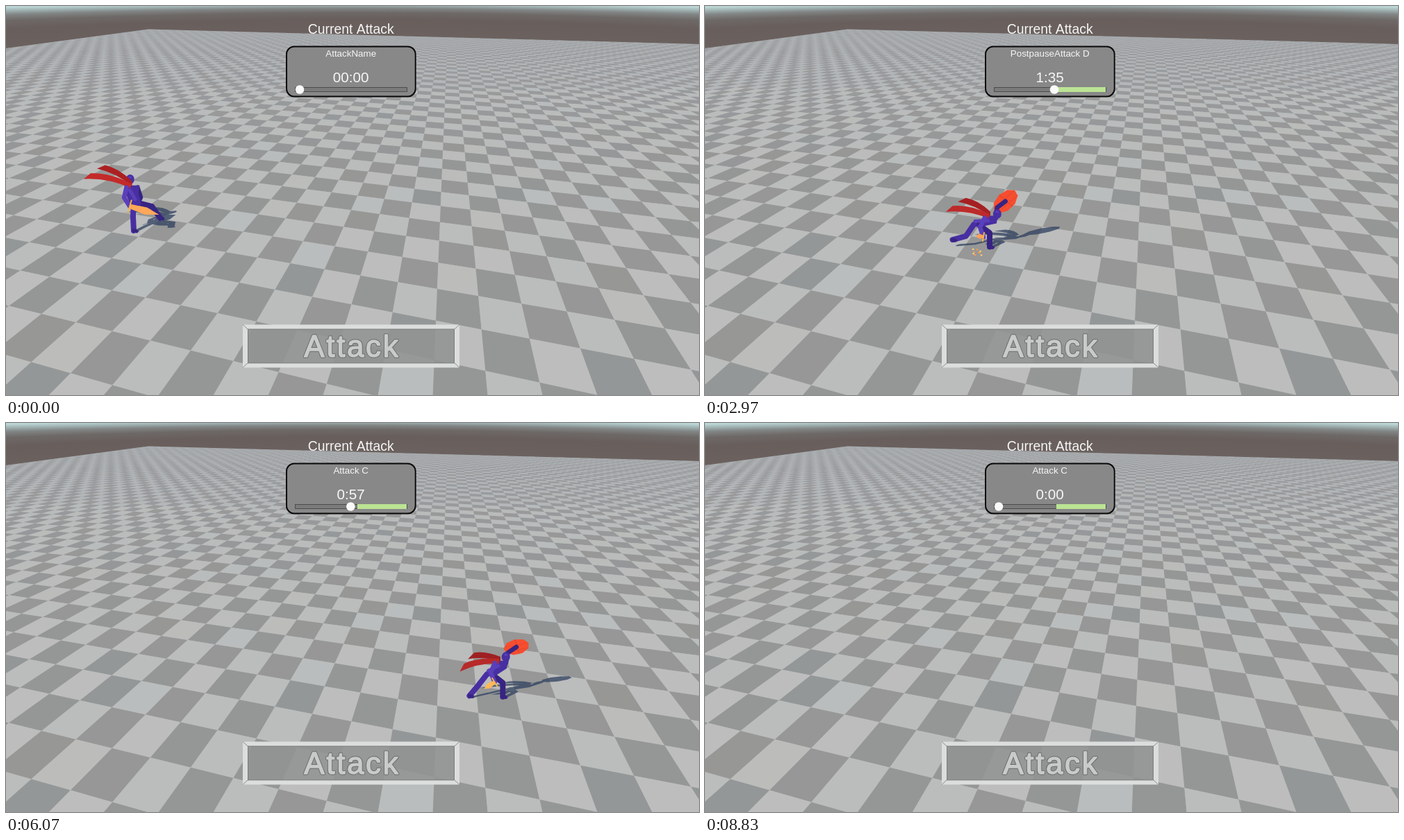
Write an HTML page with a canvas that moves like this. It is 998 px wide and 561 px high and loops after 9100 ms.

```html
<!DOCTYPE html>
<html lang="en">
<head>
<meta charset="utf-8">
<title>Current Attack</title>
<style>
html, body { margin: 0; width: 100%; height: 100%; overflow: hidden; background: #6a615f; }
canvas { display: block; }
</style>
</head>
<body>
<canvas id="stage" width="998" height="561"></canvas>
<script>
const W = 998, H = 561, LOOP = 9100;
const FONT = '"Liberation Sans", Arial, sans-serif';
const g = document.getElementById('stage').getContext('2d');

function layer() {
  const c = document.createElement('canvas');
  c.width = W; c.height = H;
  return c.getContext('2d');
}
const mix = (a, b, k) => a + (b - a) * k;
const clamp = v => Math.max(0, Math.min(1, v));
const smooth = k => k * k * (3 - 2 * k);
const rgb = (r, gr, b) => `rgb(${r | 0},${gr | 0},${b | 0})`;

// ---------- scene ----------
// Pinhole camera: focal length 486, pitched down so the horizon lies at y = -23.
const FOCAL = 486, HORIZON = -23;
const TILE = 0.1549, YAW = 13.7 * Math.PI / 180;
const stepX = TILE * Math.cos(YAW), stepZ = TILE * Math.sin(YAW);
const depth = (a, b) => 1.5685 - stepZ * a + stepX * b;
function project(a, b) {
  const y = 676 / depth(a, b);
  return [499 + 0.848 * (0.3338 + stepX * a + stepZ * b) * y, y + HORIZON];
}
function poly(c, pts) {
  c.beginPath();
  pts.forEach(p => c.lineTo(p[0], p[1]));
  c.closePath();
}
function drawSky(c) {
  const haze = [[0.028, '#bcd6d6'], [0.033, '#a3b6b6'], [0.04, '#828686'], [0.05, '#6d6866'], [0.065, '#685e5c'], [0.1, '#6b625f']];
  for (let x = 0; x < W; x += 4) {
    // the same angle below the horizon sits lower towards the sides
    const ray = Math.hypot(FOCAL, 270, x - 499) / 0.848;
    const sky = c.createLinearGradient(0, HORIZON, 0, HORIZON + 0.1 * ray);
    haze.forEach(h => sky.addColorStop(h[0] / 0.1, h[1]));
    c.fillStyle = sky;
    c.fillRect(x, 0, 4, 64);
  }
}
function makeScene() {
  const c = layer();
  drawSky(c);
  poly(c, [[205, 33.5], [998, 55], [998, 561], [0, 561], [0, 61]]);
  c.clip();
  const base = c.createLinearGradient(0, 30, 0, 330);
  base.addColorStop(0, '#a9adb0');
  base.addColorStop(0.2, '#b3b6b8');
  base.addColorStop(1, '#bcbdbc');
  c.fillStyle = base;
  c.fillRect(0, 0, W, H);
  for (let j = 57; j >= -9; j--) {
    for (let i = -59; i < 38; i++) {
      if (depth(i + 1, j) < 0.7) continue;
      const q = [project(i, j), project(i + 1, j), project(i + 1, j + 1), project(i, j + 1)];
      const y = q[0][1], far = clamp(1 - (y - 30) / 200);
      const n = Math.sin(i * 12.99 + j * 78.23) * 43758.5;
      const tint = (n - Math.floor(n) - 0.5) * 2.5;
      poly(c, q);
      if ((i + j) & 1) {
        const v = 150 + far * 6;
        c.globalAlpha = clamp(0.45 + (y - 30) / 70);
        c.fillStyle = rgb(v - tint, v + 1, v + 1 + tint + far * 3);
        c.fill();
      } else if (y > 120) {
        c.globalAlpha = 0.7;
        c.fillStyle = rgb(188 - tint, 190, 189 + tint);
        c.fill();
      }
    }
  }
  return c.canvas;
}
const scene = makeScene();

// ---------- fighter ----------
// Angles in degrees: 0 points down, 90 right. Legs: thigh, shin; near side first.
const run = { lean: -14, legs: [-3, 3, 75, 35], arms: [10, -5], blade: [74, 44], cape: [-108, 68], shield: [0, 0, 0] };
const cut = { lean: 12, legs: [-45, 18, 50, 0], arms: [5, 142], blade: [13, 30], cape: [-52, 52], shield: [15, 8, 40] };
const low = { lean: 65, legs: [-34, -75, 53, 0], arms: [-4, 150], blade: [-100, 11], cape: [-106, 62], shield: [21, 13, -43] };
const stand = { lean: 0, legs: [-40, -25, 56, 20], arms: [-22, 52], blade: [17, 38], cape: [-36, 44], shield: [11, 23, -11] };
const turn = { lean: 5, legs: [-35, -30, 50, 16], arms: [-100, -36], blade: [-113, 13], cape: [22, 46], shield: [16, 33, -9] };
const guard = { lean: 22, legs: [-63, -20, 80, 75], arms: [65, -138], blade: [197, 57], cape: [-95, 74], shield: [20, 9, 6] };

function blend(a, b, k) {
  if (typeof a === 'number') return mix(a, b, k);
  if (Array.isArray(a)) return a.map((v, i) => blend(v, b[i], k));
  const out = {};
  for (const name in a) out[name] = blend(a[name], b[name], k);
  return out;
}
function reach(p, deg, len) {
  const r = deg * Math.PI / 180;
  return [p[0] + Math.sin(r) * len, p[1] + Math.cos(r) * len];
}
const chain = (p, a, b, len) => {
  const mid = reach(p, a, len);
  return [p, mid, reach(mid, b, len)];
};

// ---------- attacks ----------
const moves = {
  A: { name: 'Attack A', time: 0.57, open: 518, close: 577, beats: [stand, guard, stand] },
  B: { name: 'Attack B', time: 0.6, open: 497, close: 554, beats: [stand, turn, cut, stand] },
  C: { name: 'Attack C', time: 1.15, open: 506, close: 577, beats: [stand, low, cut, stand] },
  D: { name: 'PostpauseAttack D', time: 2.5, open: 504, close: 577, beats: [stand, low, stand] }
};
const starts = [[540, 'A'], [988, 'B'], [1618, 'D'], [4480, 'A'], [5012, 'B'],
  [5500, 'C'], [6608, 'A'], [7060, 'B'], [7620, 'C']];
const path = [[0, 187], [560, 190], [1370, 277], [1620, 298], [2970, 390], [3830, 481],
  [4480, 484], [5270, 547], [6900, 850], [8300, 1180], [LOOP, 1400]];

function current(t) {
  const last = starts.filter(s => s[0] <= t).pop();
  if (!last) return null;
  const move = moves[last[1]], s = (t - last[0]) / 1000;
  return { move, s: s < move.time ? s : 0 };
}
function placeX(t) {
  const n = path.findIndex(k => k[0] > t), [a, b] = [path[n - 1], path[n]];
  return mix(a[1], b[1], (t - a[0]) / (b[0] - a[0]));
}
// each pose is held, then snaps to the next one
function poseOf(now, t) {
  if (!now) return blend(run, stand, smooth(clamp((t - 400) / 140)));
  const beats = now.move.beats, f = now.s / now.move.time * (beats.length - 1), n = Math.floor(f);
  return blend(beats[n], beats[n + 1], smooth(clamp((f - n - 0.3) / 0.45)));
}
function fighterAt(t, now) {
  const p = poseOf(now, t), x = placeX(t);
  const neck = reach([0, 0], 180 - p.lean, 23), [nx, ny] = neck;
  const [a, b] = p.arms, l = p.legs;
  const arms = [chain([nx - 8, ny + 1], a - 23, a + 23, 15), chain([nx + 8, ny + 1], b + 23, b - 23, 15)];
  const legs = [chain([-3, 1], l[0], l[1], 20), chain([4, 1], l[2], l[3], 20)];
  const tip = reach(arms[0][2], ...p.blade);
  return {
    x, y: 283 + 0.154 * (x - 187), neck, arms, legs, tip, cape: p.cape, shield: p.shield,
    head: reach(neck, 180 - p.lean, 11), ground: Math.max(legs[0][2][1], legs[1][2][1]) + 2
  };
}

function limb(c, pts, w, color) {
  c.strokeStyle = color;
  c.lineWidth = w;
  c.lineCap = c.lineJoin = 'round';
  c.beginPath();
  pts.forEach(p => c.lineTo(p[0], p[1]));
  c.stroke();
}
function ribbon(c, root, deg, len, color) {
  const end = reach(root, deg, len), bend = reach(reach(root, deg, len / 2), deg - 90, len * 0.12);
  const a = reach(end, deg + 90, 5), b = reach(reach(end, deg - 90, 5), deg, -8);
  const m = reach(bend, deg + 90, 4), n = reach(bend, deg - 90, 4);
  c.fillStyle = color;
  c.beginPath();
  c.moveTo(root[0], root[1] + 4);
  c.quadraticCurveTo(...m, ...a);
  c.lineTo(...b);
  c.quadraticCurveTo(...n, root[0], root[1] - 3);
  c.fill();
}
function drawShield(c, p, paint) {
  const [w, h, tilt] = p.shield, near = clamp((h - 23) / 10);
  if (w < 1 || h < 1) return;
  c.save();
  c.translate(...p.arms[1][2]);
  c.rotate(tilt * Math.PI / 180);
  c.scale(w, h);
  c.beginPath();
  for (let i = 0; i < 9; i++) {
    const a = i * Math.PI * 2 / 9 + 0.5;
    c.lineTo(Math.cos(a), Math.sin(a));
  }
  c.closePath();
  c.fillStyle = paint(mix(247, 255, near), mix(77, 113, near), mix(48, 58, near));
  c.fill();
  c.strokeStyle = paint(215, 70, 40);
  c.lineWidth = 0.05;
  c.beginPath();
  c.moveTo(0, -0.95); c.lineTo(0.1, 0.95);
  for (const y of [-0.3, 0.35]) { c.moveTo(-0.9, y); c.lineTo(0.9, y + 0.1); }
  c.stroke();
  c.restore();
}
function drawBlade(c, p, paint) {
  const hilt = p.arms[0][2], dx = p.tip[0] - hilt[0], dy = p.tip[1] - hilt[1];
  const len = Math.hypot(dx, dy) || 1, w = mix(3, 6, clamp(len / 57)), nx = -dy / len * w, ny = dx / len * w;
  const along = (k, side) => [hilt[0] + dx * k + nx * side, hilt[1] + dy * k + ny * side];
  poly(c, [along(0, 0.6), along(0.55, 1), p.tip, along(0.55, -1), along(0, -0.6)]);
  // edge-on blades look orange, upright ones catch the light
  c.fillStyle = paint(255, mix(150, 212, Math.abs(dy) / len), 88);
  c.fill();
  limb(c, [along(0, 1.7), along(0, -1.7)], 2, paint(248, 180, 75));
}
function drawFighter(c, p, paint) {
  const [nx, ny] = p.neck, front = p.shield[1] > 27;
  const body = paint(72, 47, 162), lit = paint(90, 63, 186), dim = paint(56, 36, 130);
  if (!front) drawShield(c, p, paint);
  limb(c, p.legs[1], 8, dim);
  limb(c, p.arms[1], 6.5, dim);
  limb(c, p.legs[0], 8, body);
  p.legs.forEach(l => limb(c, [l[2], [l[2][0] + 4, l[2][1] + 1]], 5, dim));
  poly(c, [[nx - 11, ny - 2], [nx + 11, ny - 2], [nx + 9, ny + 9], [8, 4], [-8, 4], [nx - 9, ny + 9]]);
  c.fillStyle = body;
  c.fill();
  limb(c, [[nx - 3, ny + 5], [-1, -4]], 5, lit);
  c.fillStyle = body;
  c.beginPath();
  c.ellipse(p.head[0], p.head[1], 6, 7, 0, 0, 7);
  c.fill();
  limb(c, [[p.head[0] - 1, p.head[1] - 3], [p.head[0] + 1, p.head[1] - 3]], 3, lit);
  const [deg, len] = p.cape, shadeRed = clamp((len - 40) / 25);
  ribbon(c, [nx, ny - 5], deg - 10, len * 0.8, paint(mix(125, 172, shadeRed), 32, 34));
  ribbon(c, [nx - 2, ny - 2], deg + 6, len, paint(mix(150, 196, shadeRed), 42, 42));
  limb(c, p.arms[0], 6.5, lit);
  drawBlade(c, p, paint);
  if (front) drawShield(c, p, paint);
}

// the figure laid flat on the floor, away from the sun
const shade = layer();
function drawShadow(p) {
  const gy = p.y + p.ground, dx = 0.78, dy = 0.37;
  shade.setTransform(1, 0, 0, 1, 0, 0);
  shade.clearRect(0, 0, W, H);
  shade.setTransform(1, 0, -dx, dy, dx * gy, (1 - dy) * gy);
  shade.translate(p.x, p.y);
  drawFighter(shade, p, () => '#2f405f');
  g.globalAlpha = 0.75;
  g.drawImage(shade.canvas, 0, 0);
  g.globalAlpha = 1;
}

function drawSlash(p, s) {
  if (s < 0.31 || s > 0.5) return;
  g.save();
  g.translate(p.x, p.y + 6);
  g.globalAlpha = 1 - clamp((s - 0.41) / 0.09);
  g.beginPath();
  g.rect(-100, -60, 205 * clamp((s - 0.31) / 0.05), 130);
  g.clip();
  g.fillStyle = '#fff';
  g.beginPath();
  g.moveTo(-96, 26);
  g.bezierCurveTo(-66, 70, 56, 72, 88, -20);
  g.bezierCurveTo(62, 30, -10, 38, -82, 32);
  g.fill();
  g.beginPath();
  g.moveTo(-86, 24);
  g.bezierCurveTo(-40, 30, 35, 28, 80, -4);
  g.bezierCurveTo(40, 18, -20, 23, -86, 24);
  g.fill();
  g.strokeStyle = 'rgba(255,255,255,.6)';
  g.lineWidth = 1;
  for (let i = 0; i < 8; i++) {
    g.beginPath();
    g.moveTo(66 + i, 12 - i);
    g.quadraticCurveTo(80 + i, -4 - i, 80 + i * 2.4, -29 + i * 1.7);
    g.stroke();
  }
  g.restore();
}

// embers where the blade meets the floor
function drawSparks(p, s) {
  const k = (s - 1.26) / 0.2;
  if (k < 0 || k > 1) return;
  for (let i = 0; i < 9; i++) {
    const a = i * 2.4, r = 3 + (i % 4) * 4 * k;
    g.fillStyle = i % 2 ? '#ffd27a' : '#ff9a4a';
    g.fillRect(p.x + Math.cos(a) * r * 1.3, p.y + 40 + Math.sin(a) * r * 0.6, 2.5, 2);
  }
}

// ---------- interface ----------
function label(text, y, size) {
  g.font = `${size}px ${FONT}`;
  g.textAlign = 'center';
  g.fillStyle = '#f6f6f6';
  g.fillText(text, 496.7, y);
}
function drawPanel(now) {
  label('Current Attack', 40, 19.4);
  g.beginPath();
  g.roundRect(404, 58.5, 185.7, 72, 11);
  g.fillStyle = '#888888';
  g.fill();
  g.strokeStyle = '#080808';
  g.lineWidth = 1.9;
  g.stroke();
  label(now ? now.move.name : 'AttackName', 72.6, 13.4);
  const cs = now ? Math.floor(now.s * 100 + 0.001) : 0;
  label(now ? Math.floor(cs / 100) + ':' + String(cs % 100).padStart(2, '0') : '00:00', 110, 20.7);

  const bar = (from, to, color) => {
    g.fillStyle = color;
    g.fillRect(from, 117, to - from, 7);
  };
  bar(416, 578, '#7b7b7b');
  if (now) bar(now.move.close, 577.5, '#8080f8');
  g.strokeStyle = 'rgba(60,60,60,.75)';
  g.lineWidth = 1;
  g.strokeRect(416.5, 117.5, 161, 6);
  if (now) bar(now.move.open, now.move.close, '#bbe494');
  g.fillStyle = '#fafafa';
  g.beginPath();
  g.arc(423 + (now ? 148 * now.s / now.move.time : 0), 120.5, 6.3, 0, 7);
  g.fill();
}
function drawButton(down) {
  g.save();
  g.translate(497, 490.5);
  if (down) g.scale(0.95, 0.95);
  g.fillStyle = down ? '#d0d2d1' : '#dcdedd';
  g.beginPath();
  g.rect(-156, -31, 312, 62);
  g.rect(-149, -24.5, 298, 49);
  g.fill('evenodd');
  g.fillStyle = 'rgba(145,149,147,.88)';
  g.fillRect(-149, -24.5, 298, 49);
  g.strokeStyle = 'rgba(110,114,112,.75)';
  g.lineWidth = 1;
  g.strokeRect(-148.5, -24.5, 297, 49);
  g.beginPath();
  for (const sx of [-1, 1]) for (const sy of [-1, 1]) {
    g.moveTo(sx * 156, sy * 31);
    g.lineTo(sx * 149, sy * 24.5);
  }
  g.stroke();
  g.font = `44px ${FONT}`;
  g.letterSpacing = '2.6px';
  g.textAlign = 'center';
  g.lineJoin = 'round';
  g.strokeStyle = '#6a6d6b';
  g.lineWidth = 3.4;
  g.strokeText('Attack', 1.3, 15.5);
  g.strokeStyle = g.fillStyle = '#c9cbca';
  g.lineWidth = 1.5;
  g.strokeText('Attack', 1.3, 15.5);
  g.fillText('Attack', 1.3, 15.5);
  g.restore();
}

function draw(t) {
  g.drawImage(scene, 0, 0);
  const now = current(t), p = fighterAt(t, now);
  if (p.x < W + 120) {
    drawShadow(p);
    g.save();
    g.translate(p.x, p.y);
    drawFighter(g, p, rgb);
    g.restore();
    if (now && now.move === moves.D) drawSparks(p, now.s);
    else if (now) drawSlash(p, now.s);
  }
  drawPanel(now);
  // the button is held just before each attack begins
  drawButton(starts.some(s => t >= s[0] - 180 && t < s[0] - 50));
}

let begin = null;
function tick(ms) {
  if (begin === null) begin = ms;
  draw((ms - begin) % LOOP);
  requestAnimationFrame(tick);
}
draw(0);
requestAnimationFrame(tick);
</script>
</body>
</html>
```
